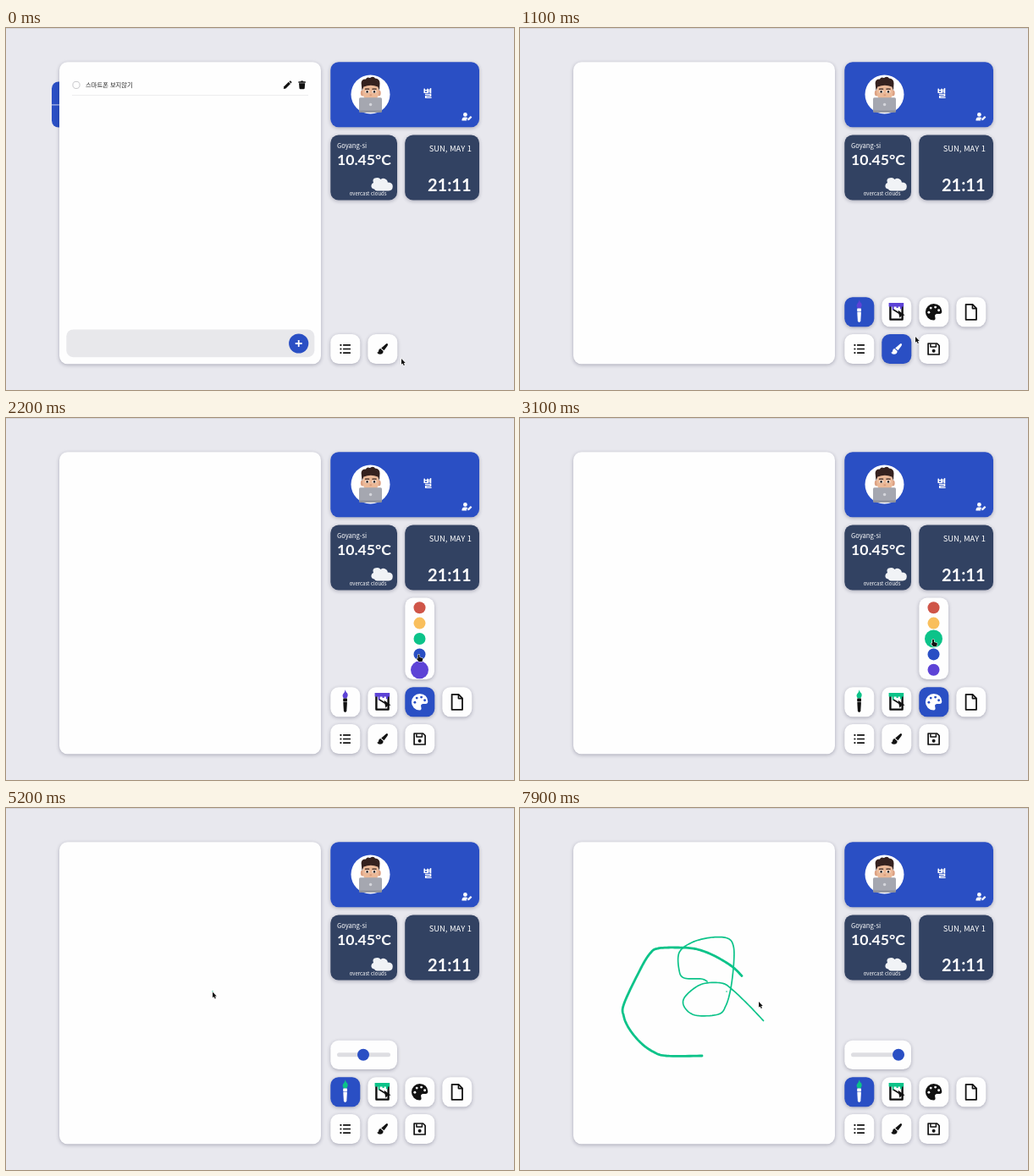
Recreate the animation shown at these times as an HTML page with a canvas. Size 600 px wide and 428 px high, loop 8000 ms.

```html
<!DOCTYPE html>
<html lang="ko">
<head>
<meta charset="utf-8">
<title>Dashboard</title>
<style>
  html, body { margin: 0; width: 100%; height: 100%; overflow: hidden; background: #e8e8ee; }
  canvas, svg { position: absolute; left: 0; top: 0; width: 600px; height: 428px; display: block; }
  text { fill: #fff; font-family: "Noto Sans CJK KR", "Noto Sans CJK", "Noto Sans", sans-serif; }
  .big { font-family: Lato, sans-serif; font-weight: 700; }
</style>
</head>
<body>
<canvas id="stage"></canvas>
<svg viewBox="0 0 600 428">
  <text id="todo" x="94" y="70" font-size="7.3" font-weight="500" style="fill:#222">스마트폰 보지않기</text>
  <text x="498" y="82.3" font-size="12" font-weight="700" text-anchor="middle">별</text>
  <text x="391" y="142" font-size="7.6">Goyang-si</text>
  <text x="391" y="162" font-size="17.6" class="big">10.45°C</text>
  <text x="427.7" y="198" font-size="6" text-anchor="middle">overcast clouds</text>
  <text x="550" y="145.5" font-size="9.4" font-weight="300" text-anchor="end">SUN, MAY 1</text>
  <text x="549.5" y="193" font-size="20" class="big" text-anchor="end">21:11</text>
</svg>
<script>
const LOOP = 8000, STEP = 100;
const BLUE = '#2a4fc4', NAVY = '#324262', INK = '#111', WHITE = '#fefefe';
const GREEN = '#0cc389', PURPLE = '#5d43d6';
const canvas = document.getElementById('stage');
const todo = document.getElementById('todo');
const c = canvas.getContext('2d');
const dpr = window.devicePixelRatio || 1;
canvas.width = 600 * dpr;
canvas.height = 428 * dpr;

// event times in ms
const T = { paint: 500, palette: 1500, blue: 2400, green: 3000, brush: 4300,
  dot: 5200, ink1: 5300, end1: 6300, drag: 6800, drop: 7000, ink2: 7300, end2: 7800 };

const clamp = v => Math.max(0, Math.min(1, v));
const mix = (a, b, k) => a + (b - a) * k;
const within = (t, a, b) => t >= a && t < b;

function rr(x, y, w, h, r, fill) {
  c.beginPath();
  c.roundRect(x, y, w, h, r);
  c.fillStyle = fill;
  c.fill();
}
function disc(x, y, r, fill) {
  c.beginPath();
  c.arc(x, y, r, 0, 7);
  c.fillStyle = fill;
  c.fill();
}
function oval(x, y, rx, ry, fill) {
  c.beginPath();
  c.ellipse(x, y, rx, ry, 0, 0, 7);
  c.fillStyle = fill;
  c.fill();
}
function shape(d, fill, x = 0, y = 0) {
  c.save();
  c.translate(x, y);
  c.fillStyle = fill;
  c.fill(new Path2D(d));
  c.restore();
}
function outline(d, color, width, x = 0, y = 0) {
  c.save();
  c.translate(x, y);
  c.strokeStyle = color;
  c.lineWidth = width;
  c.lineJoin = 'round';
  c.stroke(new Path2D(d));
  c.restore();
}
function card(x, y, w, h, fill = WHITE) {
  c.save();
  c.shadowColor = 'rgba(30,30,60,.3)';
  c.shadowBlur = 4 * dpr;
  c.shadowOffsetY = 1.2 * dpr;
  rr(x, y, w, h, 9.5, fill);
  c.restore();
}

// Catmull-Rom curve sampled into points with running length
function curve(p) {
  const out = [];
  const n = 10;
  for (let i = 0; i < p.length - 1; i++) {
    const a = p[Math.max(0, i - 1)], b = p[i], d = p[i + 1], e = p[Math.min(p.length - 1, i + 2)];
    for (let j = i ? 1 : 0; j <= n; j++) {
      const u = j / n;
      const at = k => b[k] + u / 2 * (d[k] - a[k] + u * (2 * a[k] - 5 * b[k] + 4 * d[k] - e[k]
        + u * (3 * (b[k] - d[k]) + e[k] - a[k])));
      out.push([at(0), at(1)]);
    }
  }
  let len = 0;
  out.forEach((q, i) => {
    if (i) len += Math.hypot(q[0] - out[i - 1][0], q[1] - out[i - 1][1]);
    q.push(len);
  });
  return out;
}
function along(line, k) {
  const goal = line[line.length - 1][2] * clamp(k);
  let i = 1;
  while (i < line.length - 1 && line[i][2] < goal) i++;
  const a = line[i - 1], b = line[i];
  const u = clamp((goal - a[2]) / (b[2] - a[2] || 1));
  return { i, x: mix(a[0], b[0], u), y: mix(a[1], b[1], u) };
}
function ink(line, k, width) {
  if (k <= 0) return;
  const head = along(line, k);
  c.beginPath();
  c.moveTo(line[0][0], line[0][1]);
  for (let i = 1; i < head.i; i++) c.lineTo(line[i][0], line[i][1]);
  c.lineTo(head.x, head.y);
  c.strokeStyle = GREEN;
  c.lineWidth = width;
  c.lineCap = c.lineJoin = 'round';
  c.stroke();
}

const loopA = curve([[221, 205], [214, 202], [194, 201], [188, 192], [188, 171], [203, 159], [226, 153],
  [245, 154], [252, 163], [252.5, 183], [249, 213], [243, 234], [234, 244], [207, 245], [194, 235],
  [195, 223], [214, 208.5], [238, 207], [251, 215], [270, 233], [287.5, 251.5]]);
const loopB = curve([[262, 198.5], [250, 187], [228, 174], [207, 166.5], [185, 165], [163, 166],
  [154, 171.5], [143, 189], [123, 231], [122.5, 246], [129, 261], [142, 277], [157, 288],
  [173, 293], [215, 293]]);

// pointer keys: time, x, y
const keys = [[0, 467, 391], [100, 467, 391], [300, 446, 380], [700, 446, 380], [1100, 467, 365],
  [1400, 488, 338], [1700, 488, 338], [1900, 488, 300], [2200, 487.5, 280], [2600, 488, 279],
  [2800, 488, 262], [3300, 488, 262], [3900, 440, 303.5], [4200, 401, 336], [4500, 401, 336],
  [5100, 244, 217.5], [5200, 244, 217.5], [5300, 221, 205], [6300, 287, 251], [6700, 408.5, 284],
  [6800, 422, 291], [7000, 447, 291], [7100, 447, 291], [7300, 262, 198], [7800, 215, 293], [7900, 282, 229], [8000, 282, 229]];

function pointerAt(t) {
  if (within(t, T.ink1, T.end1)) return along(loopA, (t - T.ink1) / (T.end1 - T.ink1));
  if (within(t, T.ink2, T.end2)) return along(loopB, (t - T.ink2) / (T.end2 - T.ink2));
  const i = keys.findIndex(k => k[0] > t);
  const a = keys[i - 1], b = keys[i];
  const u = (t - a[0]) / (b[0] - a[0]);
  return { x: mix(a[1], b[1], u), y: mix(a[2], b[2], u) };
}
function drawPointer(t) {
  const { x, y } = pointerAt(t);
  const hand = within(t, 200, 900) || within(t, 1300, 3400) || within(t, 4100, 4600);
  const d = hand
    ? 'M-1 1Q-1-.4 0-.4Q1-.4 1 1V3L4 3.8Q5 4 4.8 5.3L4 8H0L-2.6 4.8Q-2.4 3.8-1 4.6Z'
    : 'M0 0V6.8L1.6 5.4L2.7 8L3.9 7.5L2.8 5H4.8Z';
  outline(d, '#fff', 1.1, x, y);
  shape(d, INK, x, y);
}

const icons = {
  list(f) {
    for (const y of [-4.6, 0, 4.6]) {
      disc(-5.2, y, 1.1, f);
      rr(-2.6, y - .85, 9, 1.7, .4, f);
    }
  },
  paint(f) {
    shape('M6-6.2Q7 -5.2 5.8-3.5L1.8 1.8L-1.4-1L4-5.8Q5.2-6.8 6-6.2Z', f);
    shape('M-2.2-.4L1 2.5Q1.2 6-3 6.2Q-5.5 6.2-6.4 4Q-4.8 4.4-4.6 2.4Q-4.3-.1-2.2-.4Z', f);
  },
  save(f) {
    outline('M-6.5-6.5H4L6.5-4V6.5H-6.5Z', f, 1.7);
    outline('M-3.7-6V-2.4H2.8V-6', f, 1.5);
    disc(0, 2.3, 2, f);
  },
  brush(f, tip) {
    shape('M0-14.5Q.6-12 2.6-10.3Q4-7.5 1.6-4.4H-1.6Q-4-7-2.4-9.6Q-.4-11 0-14.5Z', tip);
    rr(-2.4, -4.4, 4.8, 4, .7, f);
    shape('M-2.3 .3H2.3L1.7 11Q0 13.2-1.7 11Z', f);
  },
  bucket(f, tip) {
    outline('M-7.2-7V8.8H7V-7', f, 2.4);
    outline('M-4-3L7.8 4.2', f, 1.6);
    shape('M2-2L10 3.8L6 4.4L3.8 7Z', f);
    shape('M-9-10.8H8.6V-6.4H6.5V-3.6H4.3V-6.4H2V-4.8H0V-6.4H-3V-2.6H-5V-6.4H-9Z', tip);
  },
  palette(f, tip, hole) {
    shape('M0-9.7A9.7 9.7 0 1 0 0 9.7Q2.6 9.5 1.8 6.5Q.6 2.8 3.7 2.3L7 2.2Q9.7 2 9.7-.8Q9-9.2 0-9.7Z', f);
    for (const [x, y] of [[-5.7, .5], [-3.4, -4.7], [2, -5.7], [6, -2]]) disc(x, y, 1.45, hole);
  },
  file(f) {
    outline('M-6-9H2L6.4-4.5V9H-6Z', f, 1.8);
    outline('M1.8-8.8V-4.2H6.2', f, 1.6);
  }
};
function button(name, col, row, on, tip) {
  const x = 383.3 + col * 44, y = 318.3 + row * 43.7;
  const back = on ? BLUE : WHITE;
  card(x, y, 35, 35, back);
  c.save();
  c.translate(x + 17.3, y + 17.5);
  icons[name](on ? '#fff' : INK, tip, back);
  c.restore();
}

function avatar() {
  disc(430.5, 78.5, 23, '#fff');
  oval(421, 77, 2.2, 3.4, '#dca183');
  oval(440.5, 77, 2.2, 3.4, '#dca183');
  oval(430.8, 75.5, 9.6, 12, '#ebb998');
  shape('M420.5 74L419.6 65Q420 60 425 60.5Q426 57.5 430 59Q434 56.5 436 59.5Q441.5 60 441.5 65.5L441 74L439.2 69.5Q431 66 422.5 69.5Z', '#35221f');
  for (const x of [426.6, 435]) {
    oval(x, 75.3, 2.3, 1.8, '#fff');
    disc(x, 75.4, 1.3, '#2b2020');
    rr(x - 2.7, 71.5, 5.4, 1.3, .6, '#35221f');
  }
  oval(430.8, 79.3, 1.5, 1, '#d99a7c');
  rr(417, 82.3, 27, 17.2, 1.6, '#a5a7b0');
  rr(417, 97.5, 27, 2.3, 1, '#8d9099');
  disc(430.6, 90.5, 1.7, '#d5d6dc');
}

function dashboard() {
  card(383.3, 40.3, 175.7, 77, BLUE);
  avatar();
  disc(542.4, 102.4, 2.4, '#fff');
  shape('M538.4 109.5Q538.4 105.4 541.4 105.4H543.6L545.4 106.2L544 108V109.5Z', '#fff');
  shape('M545 109.3L545.4 107.3L548.8 103.9L550.4 105.4L547 108.9Z', '#fff');
  card(383.3, 126.5, 78.7, 77, NAVY);
  card(471.2, 126.5, 87.8, 77, NAVY);
  shape('M435 190.5Q431.3 190 431.4 186.5Q431.5 183.5 434 183Q432 178 437 177.3Q440.5 176.3 442.5 179Q446 176.5 449.5 179.5Q451 181 450.8 182.5Q456.8 182.5 456.8 187.5Q456.5 192.4 452 192.4H438Q436 192.4 435 190.5Z', '#f1f3f6');
}

function todoPage() {
  rr(54, 63.5, 20, 54, 8, BLUE);
  rr(54, 90.4, 10, 1, 0, '#cfd7f2');
  card(63, 40.3, 309, 357);
  c.beginPath();
  c.arc(83, 67.4, 4.1, 0, 7);
  c.strokeStyle = '#b9b9bd';
  c.lineWidth = .8;
  c.stroke();
  rr(78, 79.2, 279, .9, 0, '#e6e6e9');
  shape('M327.8 72L328.3 69.3L333.8 63.8L336 66L330.5 71.5Z', INK);
  shape('M334.4 63.2L335.2 62.5Q335.8 62.2 336.4 62.8L337.2 63.6Q337.6 64.2 337.2 64.8L336.6 65.4Z', INK);
  rr(345.3, 63.3, 8.6, 1.4, .5, INK);
  rr(348, 62.5, 3.2, 1.4, .5, INK);
  shape('M346 65.3H353.2L352.7 71.2Q352.6 72.2 351.6 72.2H347.6Q346.6 72.2 346.5 71.2Z', INK);
  rr(71.3, 356.4, 293, 32.8, 8, '#e8e8eb');
  disc(345.7, 373, 11.6, BLUE);
  rr(341.7, 372.1, 8, 1.8, .4, '#fff');
  rr(344.8, 369, 1.8, 8, .4, '#fff');
}

function swatches(t) {
  card(471.3, 212.5, 34.7, 96.5);
  const picked = t < T.blue ? 4 : t < T.green ? 3 : 2;
  const over = within(t, 1900, 2300) ? 4 : within(t, 2400, 2700) ? 3 : within(t, 2800, 3400) ? 2 : -1;
  ['#cf5548', '#f9bf5c', GREEN, BLUE, PURPLE].forEach((color, i) => {
    const r = 7 + (i === picked ? 1.5 : 0) + (i === over ? 2 : 0);
    disc(488.5, 224.2 + i * 18.4, r, color);
  });
}

function slider(t) {
  card(383.3, 274.8, 78.7, 34.3);
  rr(391, 289.2, 63, 5, 2.5, '#dedee2');
  disc(mix(422, 447, clamp((t - T.drag) / (T.drop - T.drag))), 291.8, 7, BLUE);
}

function paintPage(t) {
  card(63, 40.3, 309, 357);
  if (t >= T.dot) disc(244, 217, .8, GREEN);
  ink(loopA, (t - T.ink1) / (T.end1 - T.ink1), 1.7);
  // ink trails the pointer by one step
  ink(loopB, (t - T.ink2 - STEP) / (T.end2 - T.ink2), 2.8);

  const choosing = within(t, T.palette, T.brush);
  const tip = t < T.blue ? PURPLE : t < T.green ? BLUE : GREEN;
  button('brush', 0, 0, !choosing, tip);
  button('bucket', 1, 0, false, tip);
  button('palette', 2, 0, choosing);
  button('file', 3, 0, false);
  button('save', 2, 1, false);
  if (choosing) swatches(t);
  if (t >= T.brush) slider(t);
}

function draw(t) {
  c.setTransform(dpr, 0, 0, dpr, 0, 0);
  c.fillStyle = '#e8e8ee';
  c.fillRect(0, 0, 600, 428);
  c.fillStyle = '#d4d4da';
  c.fillRect(0, 0, 600, 1);
  dashboard();
  const painting = t >= T.paint;
  todo.style.display = painting ? 'none' : '';
  if (painting) paintPage(t);
  else todoPage();
  button('list', 0, 1, false);
  button('paint', 1, 1, within(t, 300, 1200));
  drawPointer(t);
}

const start = performance.now();
function tick() {
  const t = (performance.now() - start) % LOOP;
  draw(Math.floor(t / STEP) * STEP);
  requestAnimationFrame(tick);
}
tick();
</script>
</body>
</html>
```
